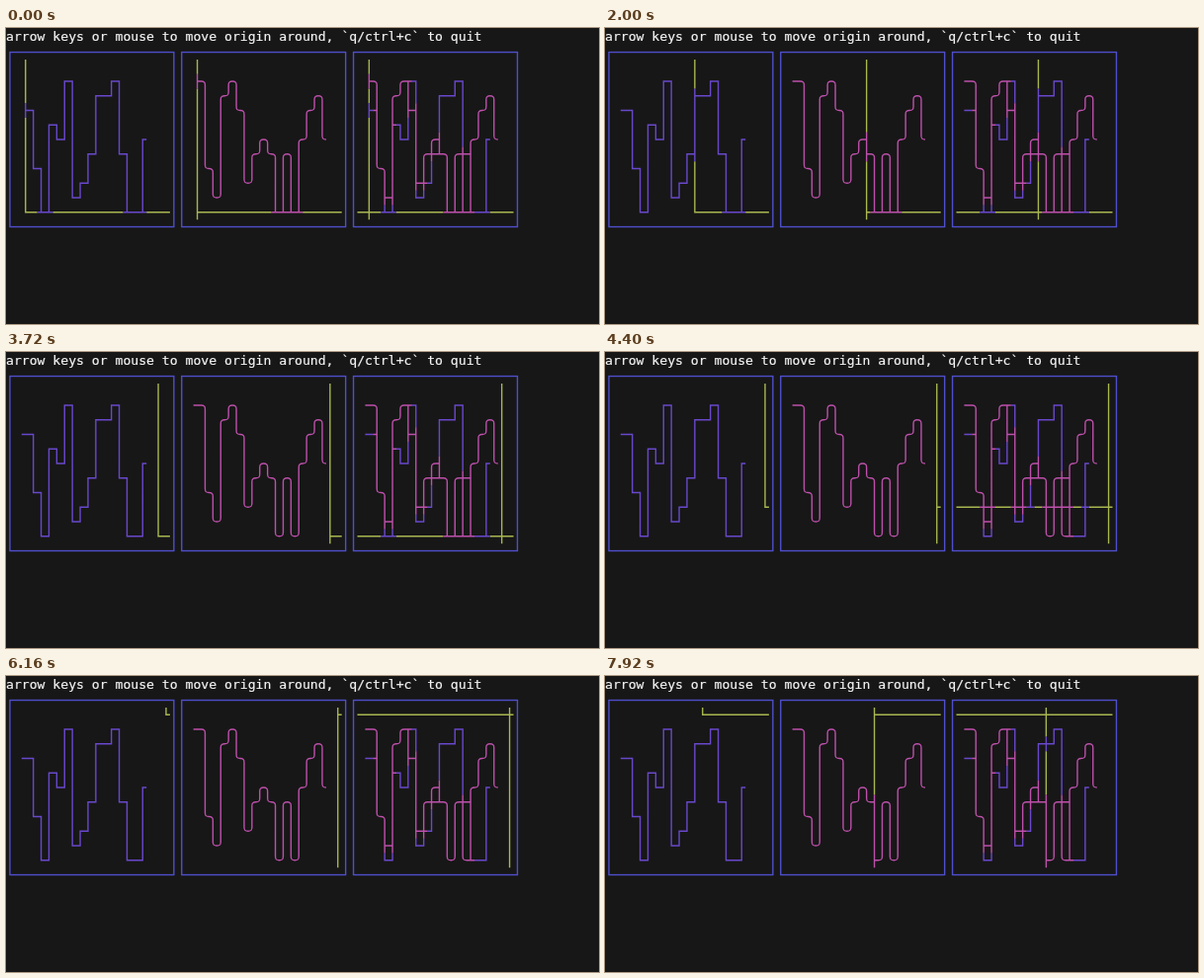
Recreate the animation shown at these times as an HTML page with a canvas. Size 600 px wide and 300 px high, loop 8000 ms.

```html
<!DOCTYPE html>
<html lang="en">
<head>
<meta charset="utf-8">
<title>Movable chart origin</title>
<style>
  html, body { margin: 0; width: 100%; height: 100%; overflow: hidden; background: #171717; }
  canvas { position: absolute; left: 0; top: 0; }
  p { position: absolute; left: 0; top: 1px; margin: 0; white-space: pre; color: #f4f4f4;
      font: 13.122px/15px "DejaVu Sans Mono", monospace; -webkit-text-stroke: 0.2px; }
</style>
</head>
<body>
<canvas width="600" height="300"></canvas>
<p>arrow keys or mouse to move origin around, `q/ctrl+c` to quit</p>
<script>
const ctx = document.querySelector('canvas').getContext('2d');
const W = 7.9, H = 14.75, TOP = 2.4;             // terminal cell size and first row
const LOOP = 8000, STEP = 219.9, TICK = 40;
const YELLOW = '#d3e561', BLUE = '#8056ff', PINK = '#ed61d7', BORDER = '#5f5fff';
const LEFT = 1, RIGHT = 20, UPPER = 2, LOWER = 12, START = 2;   // chart area, in cells

const blueRows = [5, 9, 12, 6, 7, 3, 11, 10, 8, 4, 4, 3, 8, 12, 12, 7];
const pinkRows = [3, 9, 11, 4, 3, 5, 10, 8, 7, 8, 12, 8, 12, 7, 5, 4, 7];
const DIRS = { U: [0, -1], D: [0, 1], L: [-1, 0], R: [1, 0] };

const clamp = (v, lo, hi) => Math.min(hi, Math.max(lo, v));
const centerX = col => (col + 0.5) * W;
const centerY = row => TOP + (row + 0.5) * H;

// A cell keeps the arms it already has and takes the newest colour.
function put(cells, col, row, arms, color, arc = false) {
  const key = col + ',' + row;
  const old = cells.get(key)?.arms ?? '';
  cells.set(key, { col, row, color, arc, arms: [...new Set(old + arms)].join('') });
}

function drawAxes(cells, ox, oy, down, left) {
  for (let row = UPPER; row <= (down ? LOWER : oy); row++)
    put(cells, ox, row, row === oy && !down ? 'U' : 'UD', YELLOW);
  for (let col = left ? LEFT : ox; col <= RIGHT; col++)
    put(cells, col, oy, col === ox && !left ? 'R' : 'LR', YELLOW);
}

function drawSeries(cells, ox, rows, color, arc) {
  rows.forEach((row, i) => {
    const col = START + i, prev = rows[i - 1];
    if (i === 0) return put(cells, col, row, ox === col ? 'UDR' : 'LR', color, arc);
    if (row === prev) return put(cells, col, row, 'LR', color, arc);
    const [out, back] = row > prev ? 'DU' : 'UD';
    put(cells, col, prev, 'L' + out, color, arc);
    for (let r = Math.min(row, prev) + 1; r < Math.max(row, prev); r++)
      put(cells, col, r, 'UD', color, arc);
    put(cells, col, row, back + 'R', color, arc);
  });
}

function traceCell(path, { col, row, arms, arc }, offset) {
  const x = centerX(col + offset), y = centerY(row);
  const edge = a => [x + DIRS[a][0] * W / 2, y + DIRS[a][1] * H / 2];
  const vert = [...arms].find(a => 'UD'.includes(a));
  const horiz = [...arms].find(a => 'LR'.includes(a));
  if (arc && arms.length === 2 && vert && horiz) {
    const dy = DIRS[vert][1] * W / 2;
    path.moveTo(...edge(vert));
    path.lineTo(x, y + dy);
    path.bezierCurveTo(x, y + dy / 2, x, y, ...edge(horiz));
    return;
  }
  const [first, ...rest] = arms;
  for (const arm of rest) {
    path.moveTo(...edge(first));
    path.lineTo(x, y);
    path.lineTo(...edge(arm));
  }
}

function drawChart(index, ox, oy) {
  const cells = new Map(), offset = index * 22;
  drawAxes(cells, ox, oy, index > 0, index > 1);
  if (index !== 1) drawSeries(cells, ox, blueRows, BLUE, false);
  if (index !== 0) drawSeries(cells, ox, pinkRows, PINK, true);

  ctx.strokeStyle = BORDER;
  ctx.strokeRect(centerX(offset), centerY(1), 21 * W, 12 * H);
  for (const color of [YELLOW, BLUE, PINK]) {
    const path = new Path2D();
    for (const cell of cells.values()) if (cell.color === color) traceCell(path, cell, offset);
    ctx.strokeStyle = color;
    ctx.stroke(path);
  }
}

function frame(now) {
  const t = Math.floor(now % LOOP / TICK) * TICK;
  const k = Math.ceil((t + 18.4) / STEP) - 1;    // key presses so far
  // 18 presses right, 10 up, then left
  const ox = START + Math.min(k, 18) - Math.max(k - 28, 0);
  const oy = LOWER - clamp(k - 18, 0, 10);
  ctx.clearRect(0, 0, 600, 300);
  ctx.lineWidth = 1.4;
  ctx.globalAlpha = 0.78;
  for (let i = 0; i < 3; i++) drawChart(i, ox, oy);
  requestAnimationFrame(frame);
}
requestAnimationFrame(frame);
</script>
</body>
</html>
```
